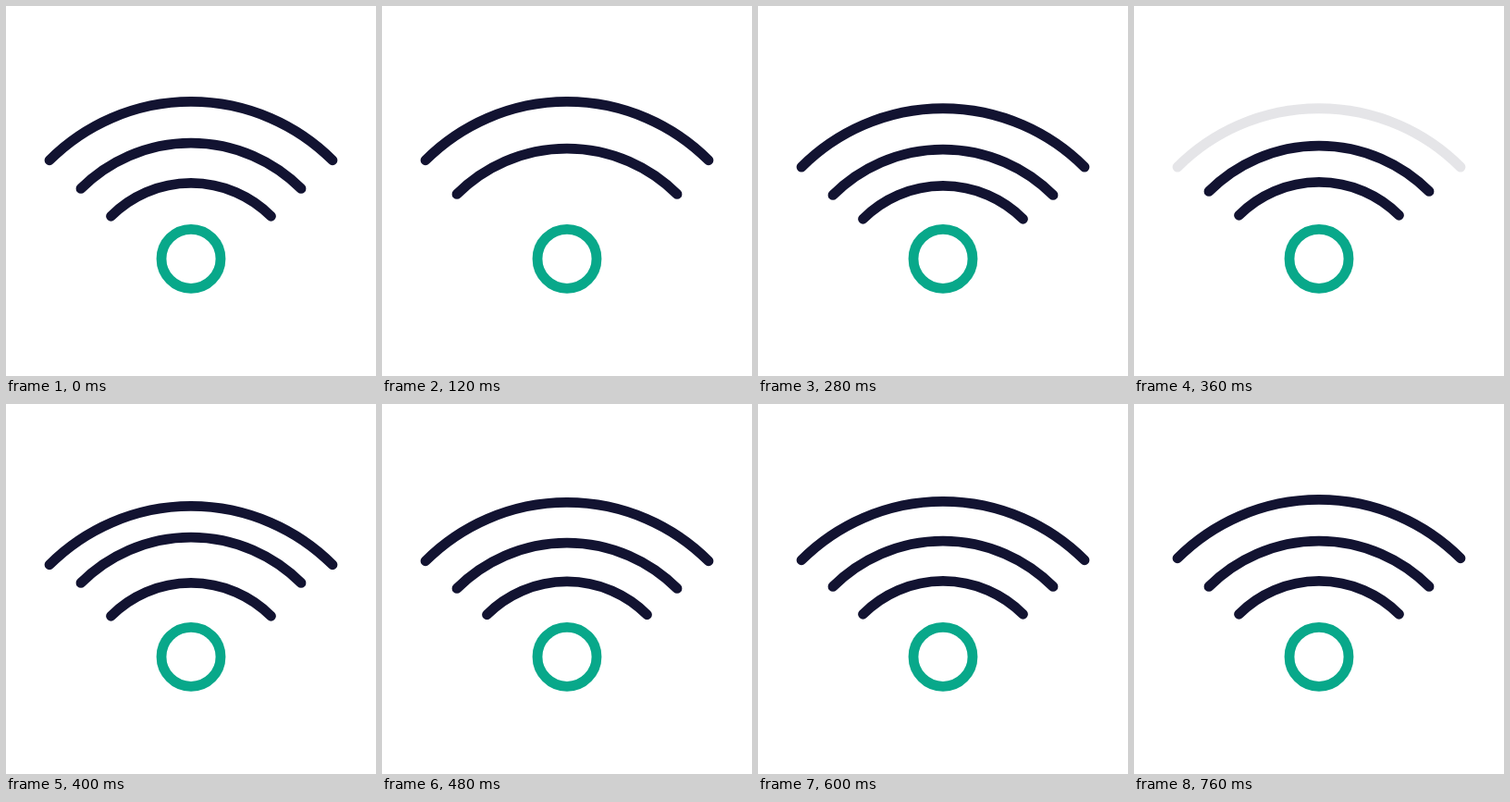
Animation of 400 by 400 pixels, one loop 800 ms. Source, as an HTML page:

```html
<!DOCTYPE html>
<html lang="en">
<head>
<meta charset="utf-8">
<title>Signal</title>
<style>
  html, body { margin: 0; width: 100%; height: 100%; overflow: hidden; background: #fff; }
  svg { display: block; width: 100vw; height: 100vh; }
</style>
</head>
<body>
<svg viewBox="0 0 400 400" fill="none" stroke-width="10.8" stroke-linecap="round">
  <g id="waves" stroke="#121331"></g>
  <circle cx="200" cy="273.3" r="32" stroke="#08a88a"/>
</svg>
<script>
const LOOP = 800;
const STEP = 40;

// Each wave sinks, vanishes, then springs back up; one entry per step.
const drop    = [0, 6, 7.3, 7.3, 7.3, 7, 6, 3, -4, -1, 2, -1, 0.5, 0];
const opacity = [1, 1, 1, 0, 0.11, 1];

// Quarter-circle arcs: half chord, end height, start delay in ms.
const waves = [
  { half: 86.5, y: 227.3, delay: 0 },
  { half: 119, y: 197.4, delay: 80 },
  { half: 153, y: 166.8, delay: 200 }
];

const group = document.getElementById("waves");
for (const w of waves) {
  const r = w.half * Math.SQRT2;
  w.path = document.createElementNS("http://www.w3.org/2000/svg", "path");
  w.path.setAttribute("d", `M${200 - w.half} ${w.y}A${r} ${r} 0 0 1 ${200 + w.half} ${w.y}`);
  group.append(w.path);
}

const at = (list, i) => list[Math.max(0, Math.min(i, list.length - 1))];

function draw(ms) {
  const tick = Math.floor((ms % LOOP) / STEP);
  for (const { path, delay } of waves) {
    const i = tick - delay / STEP;
    path.setAttribute("transform", `translate(0 ${at(drop, i)})`);
    path.setAttribute("opacity", at(opacity, i));
  }
}

let start;
function frame(now) {
  start ??= now;
  draw(Math.max(0, now - start));
  requestAnimationFrame(frame);
}
draw(0);
requestAnimationFrame(frame);
</script>
</body>
</html>
```
